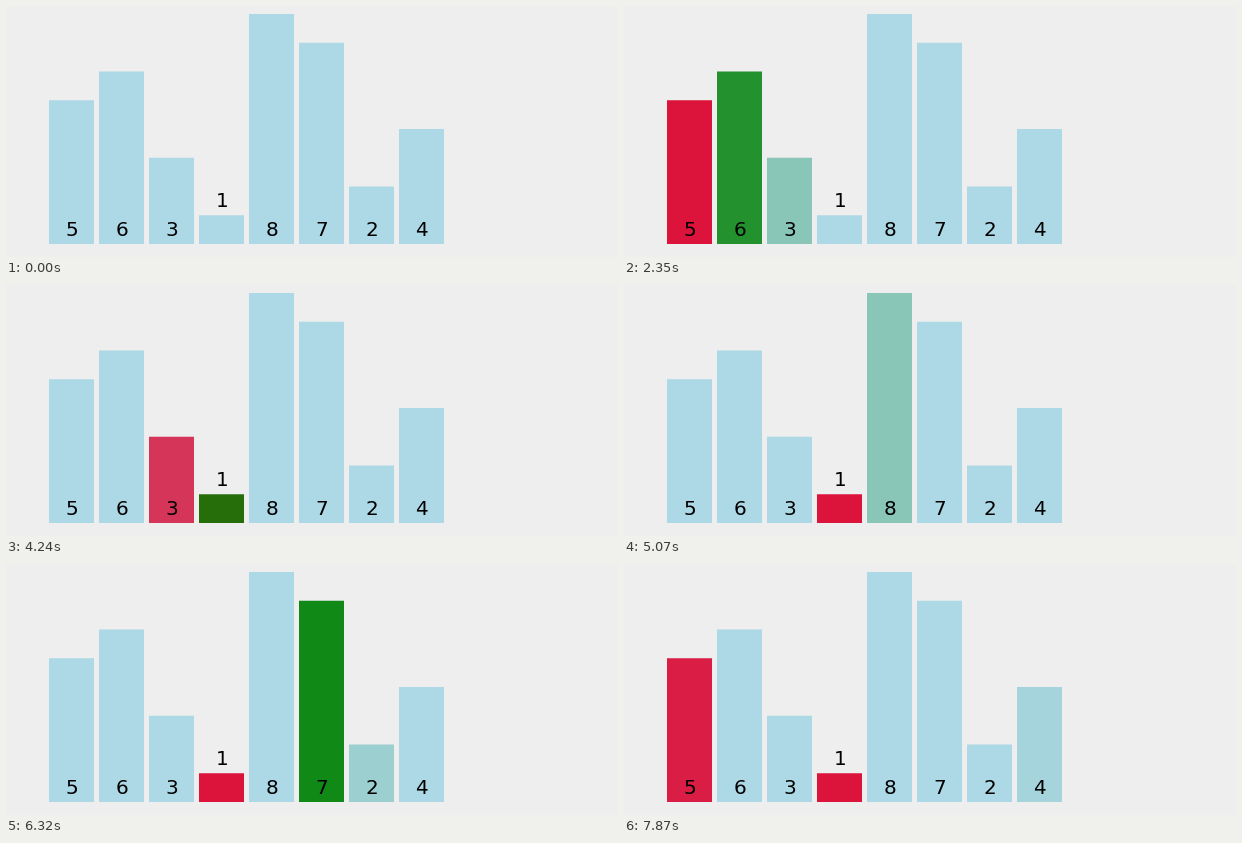
Animation, 612 px wide and 251 px high, one loop 8000 ms. Source, as a matplotlib script:

```python
import numpy as np
import matplotlib.pyplot as plt
from matplotlib.animation import FuncAnimation
from matplotlib.colors import to_rgb
from matplotlib.patches import Rectangle

W, H, DPI = 612, 251, 100
LOOP, STEP = 8000, 20
VALUES = [5, 6, 3, 1, 8, 7, 2, 4]
LEFT, PITCH, BAR_W, BASE, UNIT = 43, 50, 45, 238, 28.75

PLAIN, MIN, SCAN = (np.array(to_rgb(c)) for c in ("lightblue", "crimson", "green"))

# Selection sort, first pass: start ms, fade ms, new colour per bar
STAGES = [
    (540, 400, {0: MIN}),
    (1500, 300, {1: SCAN}),
    (2290, 300, {1: PLAIN, 2: SCAN}),
    (2880, 300, {0: PLAIN, 2: MIN}),
    (3540, 300, {3: SCAN}),
    (4190, 300, {2: PLAIN, 3: MIN}),
    (5010, 300, {4: SCAN}),
    (5637, 300, {4: PLAIN, 5: SCAN}),
    (6290, 300, {5: PLAIN, 6: SCAN}),
    (6825, 300, {6: PLAIN, 7: SCAN}),
    (7440, 450, {7: PLAIN, 0: MIN}),
]

# The picture refreshes only at these times (ms)
TICKS = np.array([
    0, 560, 700, 850, 1000, 1250, 1680, 1800, 2350, 2500, 2660,
    2930, 3050, 3200, 3720, 3840, 4240, 4360, 4640, 5070, 5220, 5370,
    5650, 5770, 5910, 6040, 6320, 6460, 6600, 6740, 6890, 7040,
    7320, 7450, 7590, 7870,
])

fig = plt.figure(figsize=((W + 0.01) / DPI, (H + 0.01) / DPI), dpi=DPI,
                 facecolor="#eeeeee")
ax = fig.add_axes([0, 0, 1, 1])
ax.set(xlim=(0, W), ylim=(H, 0))
ax.axis("off")

bars = []
for i, v in enumerate(VALUES):
    x, top = LEFT + PITCH * i, BASE - UNIT * v
    bar = Rectangle((x, top), BAR_W, UNIT * v, lw=0, fc=PLAIN, snap=False)
    bars.append(ax.add_patch(bar))
    ax.text(x + BAR_W / 2 + 0.3, min(BASE - 8, top - 8) if v == 1 else BASE - 8,
            str(v), ha="center", va="baseline", color="black",
            family="DejaVu Sans", size=20 * 72 / DPI)


def colours(t):
    state = [PLAIN] * len(VALUES)
    for start, span, targets in STAGES:
        u = np.clip((t - start) / span, 0, 1)
        for i, goal in targets.items():
            state[i] = state[i] + (goal - state[i]) * u
    return state


def update(n):
    now = n * STEP + STEP / 2
    tick = TICKS[TICKS <= now][-1]
    for bar, colour in zip(bars, colours(tick)):
        bar.set_facecolor(colour)
    return bars


anim = FuncAnimation(fig, update, frames=LOOP // STEP, interval=STEP,
                     repeat=True, repeat_delay=0, blit=False)
plt.show()
```
